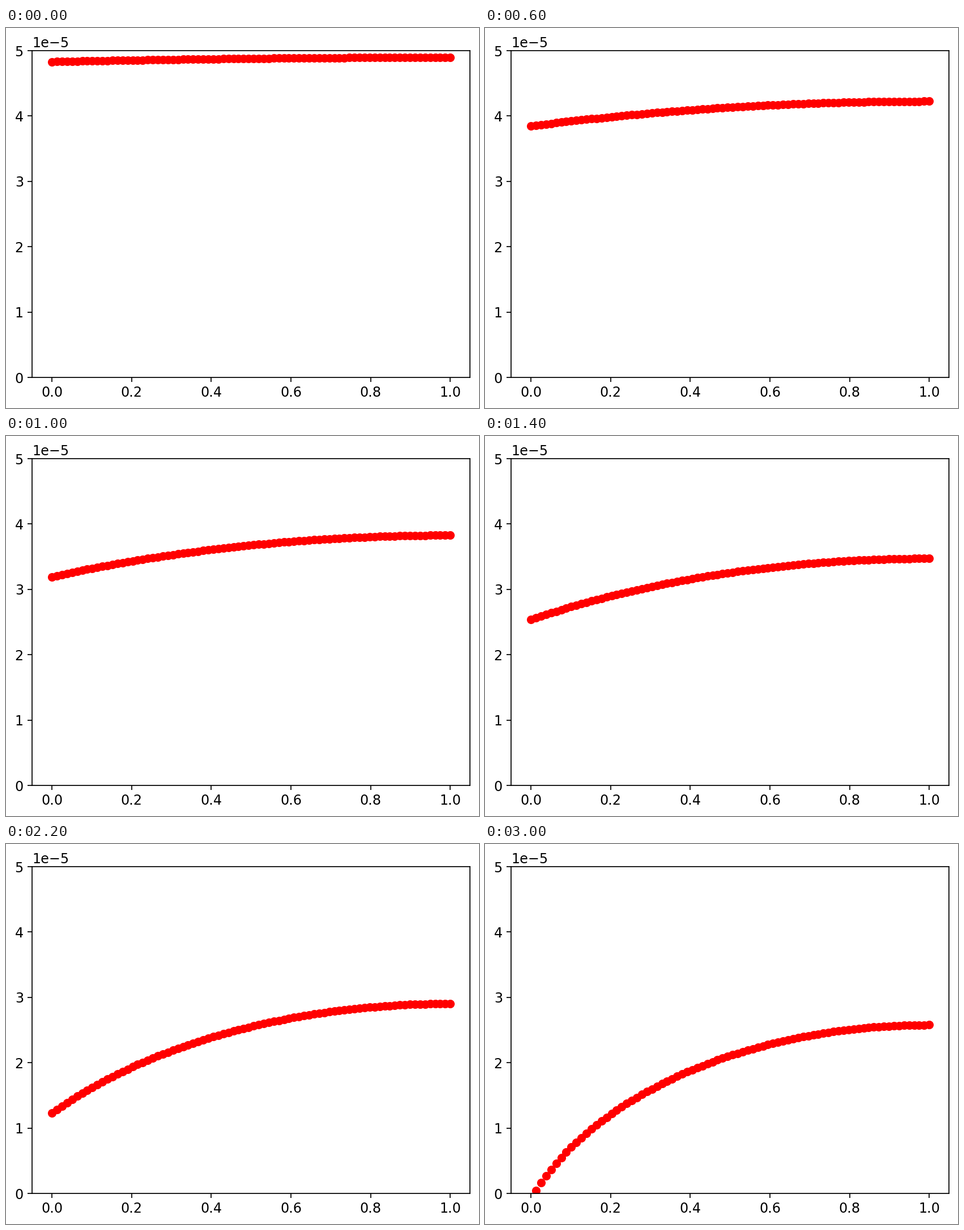
Animation, 835 px wide and 671 px high, one loop 3.1 s. Source, as a matplotlib script:

```python
import numpy as np
import matplotlib.pyplot as plt
from matplotlib.animation import FuncAnimation

W, H, DPI = 835, 671, 156
LEFT, RIGHT, TOP, BOTTOM = 46, 819.4, 40, 617
STEPS = 31
SCALE = 1e-5

plt.rcParams.update({"font.family": "DejaVu Sans", "font.size": 11})

x = np.linspace(0, 1, 80)
q = x * (2 - x)

# The right end falls ever more slowly: smooth curve through a few levels.
key_steps = [0, 6, 10, 12, 14, 18, 22, 24, 30]
key_levels = [4.896, 4.225, 3.825, 3.648, 3.47, 3.163, 2.903, 2.797, 2.578]
right_end = np.poly1d(np.polyfit(key_steps, key_levels, 4))


def profile(step):
    """The left end falls linearly; (h + c)^2 is a parabola in x."""
    c = 1.41
    a = 4.83 - 0.1637 * step + c
    b = right_end(step) + c
    return (np.sqrt(a**2 + (b**2 - a**2) * q) - c) * SCALE


fig = plt.figure(figsize=((W + 0.001) / DPI, (H + 0.001) / DPI), dpi=DPI,
                 facecolor="white")
ax = fig.add_axes([LEFT / W, 1 - BOTTOM / H,
                   (RIGHT - LEFT) / W, (BOTTOM - TOP) / H])
ax.set_xlim(-0.05, 1.05)
ax.set_ylim(0, 5 * SCALE)
ax.set_xticks(np.linspace(0, 1, 6))
ax.set_yticks(np.arange(6) * SCALE)
dots, = ax.plot(x, profile(0), "ro")


def update(step):
    dots.set_ydata(profile(step))
    return dots,


anim = FuncAnimation(fig, update, frames=STEPS, interval=100, repeat=True,
                     repeat_delay=0)
plt.show()
```
